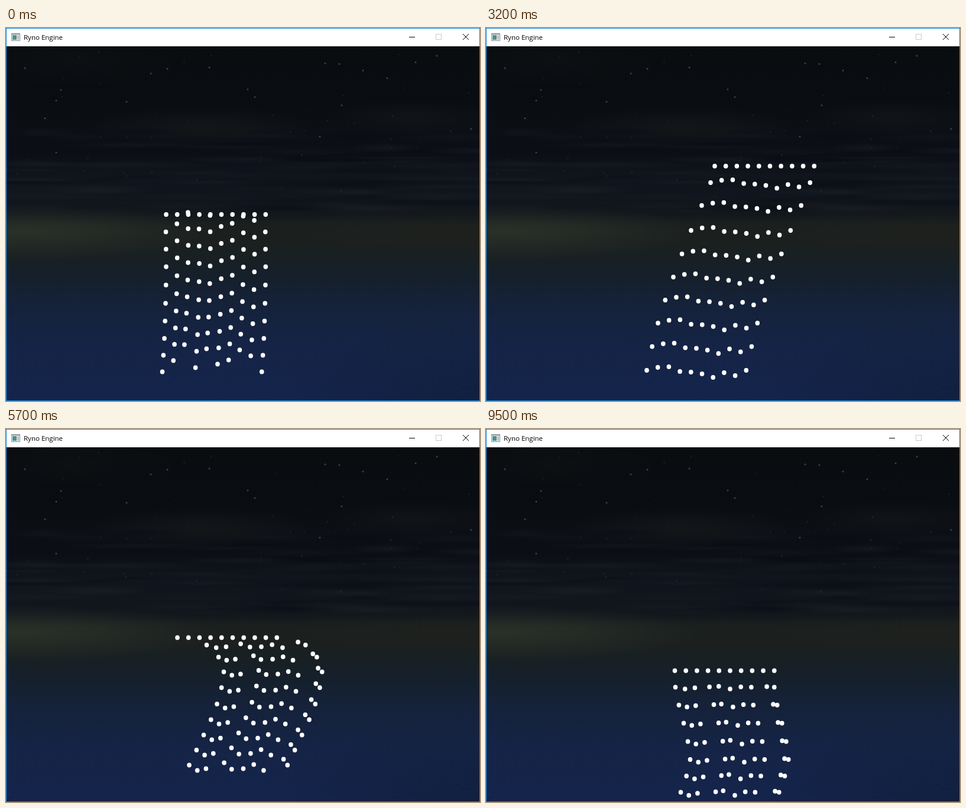
An HTML page with a canvas that plays this animation: 802 by 632 pixels, repeating every 9.6 s.

```html
<!DOCTYPE html>
<html lang="en">
<head>
<meta charset="utf-8">
<title>Ryno Engine</title>
<style>
  html, body { margin: 0; width: 100%; height: 100%; overflow: hidden; background: #fff; }
  canvas { position: absolute; left: 0; top: 0; }
  h1 { position: absolute; left: 30px; top: 8px; margin: 0; color: #000;
       font: 11.5px/16px "Open Sans", "Noto Sans", sans-serif; white-space: nowrap; }
</style>
</head>
<body>
<canvas id="stage" width="802" height="632"></canvas>
<h1>Ryno Engine</h1>
<script>
const W = 802, H = 632, LOOP = 9600, STEP = 100, N = 10, GAP = 18.7;
const ctx = document.getElementById('stage').getContext('2d');
const backdrop = document.createElement('canvas');
backdrop.width = W;
backdrop.height = H;

// Top row of the cloth: time, x of its left end, y
const path = [
  [0, 271, 316], [1000, 277, 314], [1900, 330.5, 275], [3000, 386, 223],
  [3200, 387, 234], [4100, 383, 282.5], [5000, 364, 313], [5700, 290, 353.5],
  [6000, 285, 363], [7000, 335, 364], [7200, 353, 372], [7600, 384, 396],
  [8000, 372, 409.5], [8800, 319.5, 409.5], [9500, 319.5, 409.5]
];

// Cloth poses: left edge (x, y) at the knot rows, sag of columns 1 to 8 at the hem,
// share of the sag at row 1, and strength of the sideways folds
const knots = [1, 3, 5, 7, 9];
const poses = [
  { t: 0, x: [270.5, 271, 270, 268, 264.5], y: [345.5, 404.5, 466.5, 526, 582.5],
    sag: [-19, -46, -7, -39, -13, -20, -37, -27], top: .72, fold: 0 },
  { t: 1900, x: [322, 295, 277, 269, 265.5], y: [315.5, 393, 458, 529, 603],
    sag: [-7, -15, 24, 14, 24, 29, 14, 6], top: .1, fold: 0 },
  { t: 3200, x: [380, 347, 317, 291, 272], y: [262, 343, 422, 500, 580],
    sag: [-5, -6, 2, 3, 6, 12, 4, 9], top: .8, fold: 0 },
  { t: 4100, x: [378.5, 360.5, 336.5, 314.5, 291.5], y: [306, 361, 423.5, 481, 543],
    sag: [24, 21, 3, 21, 15, 7, 24, -4], top: .12, fold: .8 },
  { t: 5700, x: [339.5, 368.5, 357, 334.5, 310], y: [366, 411.5, 466, 518.5, 569.5],
    sag: [9, 6, -4, 7, 6, -1, 9, -10], top: .5, fold: 1 },
  { t: 7200, x: [338.5, 323, 338.5, 349.5, 328.5], y: [396, 453, 507.5, 566, 618.5],
    sag: [9, 0, -2, 0, 2, -6, -1, -3], top: .2, fold: 1 },
  { t: 9500, x: [320.5, 334.5, 345.5, 329.5, 318], y: [437.5, 498.5, 560, 615.5, 673],
    sag: [6, 2, -1, -3, 6, -1, 0, -2], top: .5, fold: 1 }
];
const folds = [0, -5, -9, 3, -3, -2, -3, -5, 10, -2];

// Monotone cubic through (xs, ys)
function curve(xs, ys, x) {
  const last = xs.length - 1;
  if (x >= xs[last]) return ys[last];
  let i = 0;
  while (x >= xs[i + 1]) i++;
  const slope = k => (ys[k + 1] - ys[k]) / (xs[k + 1] - xs[k]);
  const tangent = k => {
    if (k === 0) return slope(0);
    if (k === last) return slope(last - 1);
    const a = slope(k - 1), b = slope(k);
    return a * b > 0 ? 2 * a * b / (a + b) : 0;
  };
  const h = xs[i + 1] - xs[i], u = (x - xs[i]) / h, v = 1 - u;
  return ys[i] * v * v * (1 + 2 * u) + ys[i + 1] * u * u * (3 - 2 * u)
       + h * u * v * (v * tangent(i) - u * tangent(i + 1));
}

const pathTimes = path.map(p => p[0]);
const poseTimes = poses.map(p => p.t);
const anchor = (axis, t) => curve(pathTimes, path.map(p => p[axis]), t);
const blend = (pick, t) => curve(poseTimes, poses.map(pick), t);

// Left edge of every row; upper rows follow the anchor more closely
function edge(axis, t) {
  const key = axis === 1 ? 'x' : 'y';
  const lead = anchor(axis, t);
  const drift = lead - blend(p => anchor(axis, p.t), t);
  const values = knots.map((row, k) => blend(p => p[key][k], t) + drift * Math.exp(-row / 5));
  return Array.from({ length: N }, (_, row) => curve([0, ...knots], [lead, ...values], row));
}

function drawCloth(t) {
  const xs = edge(1, t), ys = edge(2, t);
  const top = blend(p => p.top, t), fold = blend(p => p.fold, t);
  const sags = folds.map((_, c) => c % 9 ? blend(p => p.sag[c - 1], t) : 0);
  ctx.fillStyle = '#fff';
  ctx.beginPath();
  for (let r = 0; r < N; r++) {
    const hang = r ? top + (1 - top) * (r - 1) / 8 : 0;
    for (let c = 0; c < N; c++) {
      const x = xs[r] + c * GAP + folds[c] * fold * Math.min(1, r / 2);
      const y = ys[r] + sags[c] * hang;
      ctx.moveTo(x + 3.8, y);
      ctx.ellipse(x, y, 3.8, 4, 0, 0, 7);
    }
  }
  ctx.fill();
}

function drawBackdrop(g) {
  let seed = 7;
  const rand = (a, b) => {
    seed = (seed * 16807) % 2147483647;
    return a + (b - a) * seed / 2147483647;
  };
  const rect = (color, x, y, w, h) => {
    g.fillStyle = color;
    g.fillRect(x, y, w, h);
  };
  const blob = (x, y, rx, ry, rgb, alpha) => {
    g.save();
    g.translate(x, y);
    g.scale(rx, ry);
    const glow = g.createRadialGradient(0, 0, 0, 0, 0, 1);
    glow.addColorStop(0, `rgba(${rgb},${alpha})`);
    glow.addColorStop(1, `rgba(${rgb},0)`);
    rect(glow, -1, -1, 2, 2);
    g.restore();
  };

  rect('#1883d7', 0, 0, W, H);
  rect('#fff', 1, 1, W - 2, 30);

  g.save();
  g.beginPath();
  g.rect(1, 31, W - 2, H - 32);
  g.clip();
  const sky = g.createLinearGradient(0, 31, 0, 631);
  [[31, '#0a0d0f'], [120, '#090c11'], [170, '#0c0f14'], [210, '#0b0e16'], [250, '#10141c'],
   [295, '#11151d'], [315, '#12171d'], [335, '#1b201f'], [360, '#1b201f'], [390, '#182023'],
   [430, '#15202e'], [480, '#15223c'], [540, '#152446'], [631, '#14244c']]
    .forEach(([y, color]) => sky.addColorStop((y - 31) / 600, color));
  rect(sky, 0, 31, W, 600);

  blob(30, 345, 330, 48, '52,60,46', .6);
  blob(760, 345, 300, 45, '32,32,26', .45);
  blob(800, 640, 330, 150, '14,26,50', .5);
  blob(330, 168, 190, 34, '28,29,31', .5);
  blob(690, 150, 150, 30, '24,26,29', .45);
  blob(110, 60, 180, 40, '17,20,22', .5);
  for (let i = 0; i < 70; i++) {
    const y = rand(175, 312);
    const light = rand(0, 1) < .5;
    blob(rand(0, W), y, rand(50, 170), rand(3, 9), light ? '31,34,39' : '7,9,16', rand(.15, .5));
  }

  const star = (x, y, alpha) => {
    g.fillStyle = `rgba(105,115,115,${alpha})`;
    g.beginPath();
    g.arc(x, y, 1.6, 0, 7);
    g.fill();
  };
  [[32, 68], [93, 105], [85, 123], [85, 211], [273, 69], [245, 77], [344, 67], [409, 104],
   [421, 117], [540, 60], [564, 61], [604, 72], [568, 131], [531, 184], [729, 47], [787, 171],
   [645, 85], [204, 125], [66, 153], [693, 58]].forEach(([x, y]) => star(x, y, .5));
  for (let i = 0; i < 60; i++) star(rand(0, W), rand(35, 280), rand(.05, .18));

  g.lineWidth = 1;
  for (let i = 0; i < 420; i++) {
    const x = rand(0, W), y = rand(440, 631);
    const tilt = (x - 400) / 130;
    g.strokeStyle = `rgba(6,12,30,${rand(.04, .2) * (y - 400) / 230})`;
    g.beginPath();
    g.moveTo(x, y);
    g.lineTo(x + tilt * 2 + 2, y + 3);
    g.stroke();
  }
  g.restore();

  // Title bar icon and window buttons
  rect('#8a8f94', 9, 9, 15, 13);
  rect('#f2f4f5', 10, 11, 13, 10);
  rect('#4f9190', 11, 12, 7, 8);
  rect('#b9bdc0', 19, 12, 3, 8);
  rect('#000', 682, 15, 10, 1);
  g.strokeStyle = '#ccc';
  g.strokeRect(727.5, 10.5, 9, 9);
  g.strokeStyle = '#000';
  g.beginPath();
  g.moveTo(773, 10);
  g.lineTo(783, 20);
  g.moveTo(783, 10);
  g.lineTo(773, 20);
  g.stroke();
}

function frame() {
  const t = Math.floor(performance.now() % LOOP / STEP) * STEP;
  ctx.drawImage(backdrop, 0, 0);
  ctx.save();
  ctx.beginPath();
  ctx.rect(1, 31, W - 2, H - 32);
  ctx.clip();
  drawCloth(t);
  ctx.restore();
  requestAnimationFrame(frame);
}

drawBackdrop(backdrop.getContext('2d'));
frame();
</script>
</body>
</html>
```
